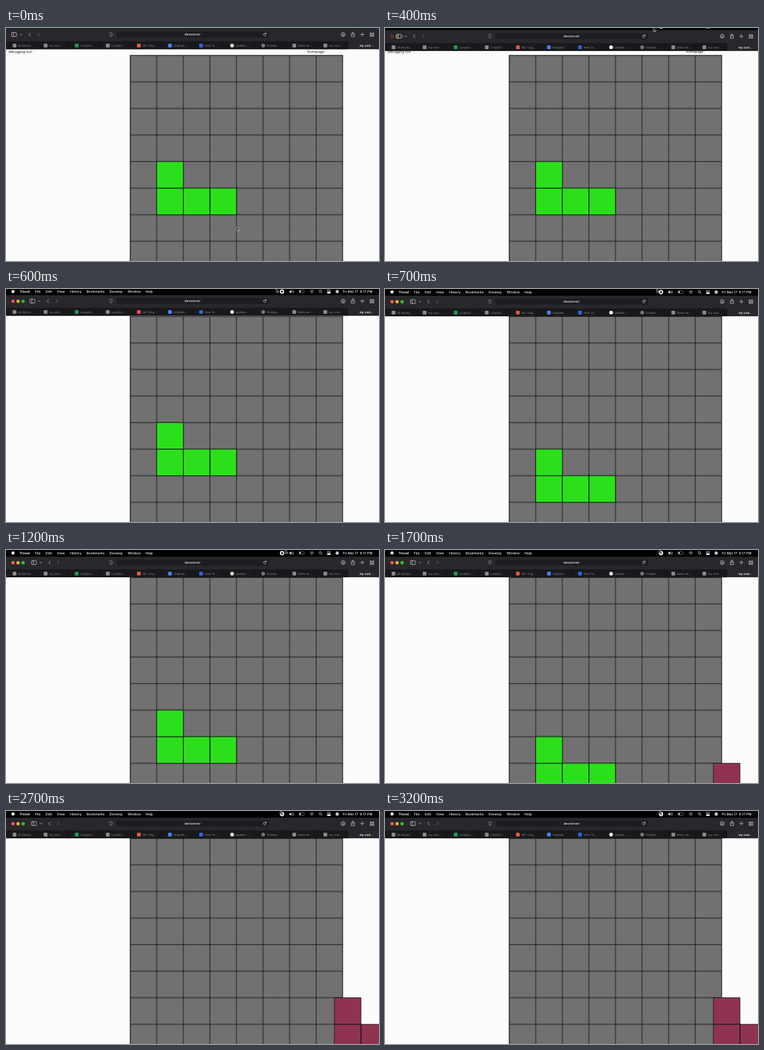
Write an HTML page that moves like this. It is 600 px wide and 375 px high and loops after 3.5 s.

```html
<!DOCTYPE html>
<html lang="en">
<head>
<meta charset="utf-8">
<title>Falling blocks</title>
<style>
  @property --p { syntax: "<number>"; inherits: true; initial-value: 0; }
  html, body { margin: 0; width: 100%; height: 100%; overflow: hidden; background: #fcfcfc; }
  svg { display: block; width: 600px; height: 375px; animation: reveal 3.5s step-end infinite; }
  text { font-family: Inter, "Open Sans", sans-serif; text-rendering: geometricPrecision; }

  /* --p: how far the menu bar has slid in */
  @keyframes reveal {
    0% { --p: 0; }
    8.571% { --p: .04; }
    11.428% { --p: .29; }
    14.285% { --p: .65; }
    17.142% { --p: .92; }
    20%, 100% { --p: 1; }
  }
  .bar { transform: translateY(calc(var(--p) * 9.7px)); }
  .menu { transform: translateY(calc((var(--p) - 1) * 10.5px)); }
  .nav { transform: translateX(calc(var(--p) * 32px)); }
  .lights { opacity: var(--p); }

  .cell { stroke: #111; stroke-width: .9; }
  .green { fill: #2be01b; animation: fall 3.5s step-end infinite; }
  .plum { fill: #903351; animation: rise 3.5s step-end infinite; }
  @keyframes fall {
    0% { transform: none; }
    20% { transform: translateY(42.75px); }
    48.57% { transform: translateY(85.5px); }
    77.14%, 100% { transform: translateY(200px); }
  }
  @keyframes rise {
    0% { transform: translateY(200px); }
    48.57% { transform: translateY(42.75px); }
    77.14%, 100% { transform: none; }
  }

  .pointer { animation: point 3.5s linear infinite; }
  @keyframes point {
    0% { transform: translate(371px, 320.5px); animation-timing-function: step-end; }
    2.857% { transform: translate(428px, 27px); animation-timing-function: step-end; }
    8.571% { transform: translate(431px, 0); }
    14.285% { transform: translate(432.5px, -.3px); }
    20% { transform: translate(437px, -.5px); }
    34.285% { transform: translate(449.3px, -.3px); }
    48.57%, 100% { transform: translate(441.3px, -.3px); }
  }

  .line { fill: none; stroke: #c9c8cc; stroke-width: .8; stroke-linecap: round; stroke-linejoin: round; }
  .dim { stroke: #77767a; }
  .tabs text { font-size: 4.6px; fill: #8d8c90; }
  .tabs .on { fill: #fff; font-weight: 600; }
  .menu text { font-size: 5.4px; fill: #f4f4f4; font-weight: 500; }
  .page text { font-size: 5.3px; fill: #111; }
  .page .button { fill: #fff; stroke: #cfcfcf; stroke-width: .5; }
</style>
</head>
<body>
<svg viewBox="0 0 600 375">
  <defs>
    <pattern id="grid" x="199.75" y="44" width="42.75" height="42.75" patternUnits="userSpaceOnUse">
      <path d="M0 0H42.75V42.75H0Z" fill="#717171" stroke="#111" stroke-width="1"/>
    </pattern>
  </defs>

  <g class="page">
    <rect width="600" height="375" fill="#fcfcfc"/>
    <rect class="button" x="1" y="34.5" width="44.5" height="7.5" rx="1.5"/>
    <text x="4" y="40">debugging tool</text>
    <rect class="button" x="481.5" y="34.5" width="32.5" height="7.5" rx="1.5"/>
    <text x="484.5" y="40">Homepage</text>
    <rect x="199.75" y="44" width="342" height="342" fill="url(#grid)" stroke="#111" stroke-width=".9"/>
    <g class="cell green">
      <path d="M242.5 215h42.75v42.75h-42.75zM242.5 257.75h42.75v42.75h-42.75zM285.25 257.75H328v42.75h-42.75zM328 257.75h42.75v42.75H328z"/>
    </g>
    <g class="cell plum">
      <path d="M528.25 300.5H571v42.75h-42.75zM528.25 343.25H571V386h-42.75zM571 343.25h42.75V386H571z"/>
    </g>
  </g>

  <g class="bar">
    <rect y="-10" width="600" height="44.2" fill="#28272b"/>
    <rect x="178" y="5.8" width="245" height="9.4" rx="2" fill="#1d1c20"/>
    <text x="300" y="12.4" text-anchor="middle" font-size="5.3" font-weight="500" fill="#f2f2f2">devserver</text>
    <g class="lights">
      <circle cx="11.3" cy="10.8" r="2.7" fill="#f25a52"/>
      <circle cx="19.4" cy="10.8" r="2.7" fill="#e0b02f"/>
      <circle cx="27.5" cy="10.8" r="2.7" fill="#36b83f"/>
    </g>
    <g class="nav line">
      <rect x="9" y="7.5" width="8" height="6.2" rx="1"/>
      <path d="M12 7.5v6.2M22.5 10l1.5 1.5 1.5-1.5M39.2 8l-2.6 2.6 2.6 2.6"/>
      <path class="dim" d="M51 8l2.6 2.6-2.6 2.6"/>
    </g>
    <g class="line">
      <path class="dim" d="M169 7.4l2.6 1v2.2q0 2-2.6 3.2-2.6-1.2-2.6-3.2V8.4zM169 7.4v6.4"/>
      <path d="M418.2 9.4a2.2 2.2 0 1 0 .2 1.6M418.5 7.8v1.8h-1.8"/>
      <circle cx="542.3" cy="10.5" r="3.2"/>
      <path d="M542.3 8.8v3.3M541 11l1.3 1.3 1.3-1.3"/>
      <path d="M556.8 9.3h-1.4v4.6h5.2V9.3h-1.4M558 11.5V6.6M556.5 8L558 6.5 559.5 8"/>
      <path d="M570.4 10.5h5.6M573.2 7.7v5.6"/>
      <path d="M586 8h2v2h-2zM589.6 8h2v2h-2zM586 11.5h2v2h-2zM589.6 11.5h2v2h-2z"/>
    </g>
    <g class="tabs" id="tabs">
      <rect y="21.5" width="550" height="12.7" fill="#19181b"/>
    </g>
  </g>

  <g class="menu">
    <rect width="600" height="10.8"/>
    <circle cx="11.3" cy="4.8" r="2.5" fill="#f4f4f4"/>
    <g id="menu"></g>
    <circle cx="444" cy="5" r="3.4" fill="#fff"/>
    <rect x="442.6" y="3.6" width="2.8" height="2.8" rx=".5"/>
    <path d="M455.8 4h1.3l1.7-1.5v5L457.100 6h-1.300z" fill="#f4f4f4"/>
    <g class="line">
      <path d="M460.200 3.700q1 1.300 0 2.600M461.700 2.800q1.900 2.200 0 4.400"/>
      <rect class="dim" x="471.500" y="2.800" width="8" height="4.200" rx="1"/>
      <path d="M489 4q3-2.600 6 0M490.200 5.500q1.800-1.500 3.600 0"/>
      <circle cx="505.500" cy="4.300" r="1.900"/>
      <path d="M507 5.800l1.700 1.700"/>
      <rect x="516.600" y="2.400" width="5.600" height="2.200" rx="1.100"/>
    </g>
    <rect x="472.300" y="3.600" width="2" height="2.600" fill="#f4f4f4"/>
    <circle cx="492" cy="7" r=".7" fill="#f4f4f4"/>
    <rect x="516.400" y="5.400" width="6" height="2.600" rx="1.300" fill="#f4f4f4"/>
    <circle cx="532.800" cy="4.900" r="2.600" fill="#c4c5d2"/>
  </g>

  <path class="pointer" d="M0 0V5.800L1.400 4.600 2.400 6.700 3.300 6.300 2.400 4.300H4.200Z" fill="#000" stroke="#fff" stroke-width=".6"/>
</svg>
<script>
  const make = (parent, tag, attrs, text = "") => {
    const el = document.createElementNS("http://www.w3.org/2000/svg", tag);
    for (const key in attrs) el.setAttribute(key, attrs[key]);
    el.textContent = text;
    parent.append(el);
  };

  const grey = "#8b8a8e";
  const tabs = [
    ["all blocks…", grey], ["my cool…", grey], ["LoopScr…", "#1f9d55"], ["LoopScr…", grey],
    ["QD: Ung…", "#dc5a4e"], ["Ungradi…", "#4384ee"], ["How To…", "#2b67dc"], ["update -…", "#f0f0f0", 1],
    ["frontpa…", "#77767a", 1], ["demo se…", grey], ["my cool…", grey], ["my cool…"]
  ];
  const strip = document.getElementById("tabs");
  tabs.forEach(([label, fill, round], i) => {
    const x = i * 50, on = !fill;
    if (i) make(strip, "rect", { x: x - .25, y: 21.5, width: .5, height: 12.7, fill: "#0e0d10" });
    if (fill) make(strip, "rect", { x: x + 10.7, y: 25.2, width: 6, height: 6, rx: round ? 3 : 1, fill });
    make(strip, "text", { x: x + (on ? 18.8 : 19.6), y: 29.9, class: on ? "on" : "" }, label);
  });

  const menu = document.getElementById("menu");
  [[22, "Trovel"], [46.5, "File"], [64, "Edit"], [82, "View"], [103, "History"], [129.7, "Bookmarks"],
   [166.5, "Develop"], [195.7, "Window"], [224.3, "Help"], [541.7, "Fri Mar 17\u2002" + "8:17 PM"]]
    .forEach(([x, label], i) =>
      make(menu, "text", { x, y: 6.8, style: i ? "" : "font-weight: 700" }, label));
</script>
</body>
</html>
```
